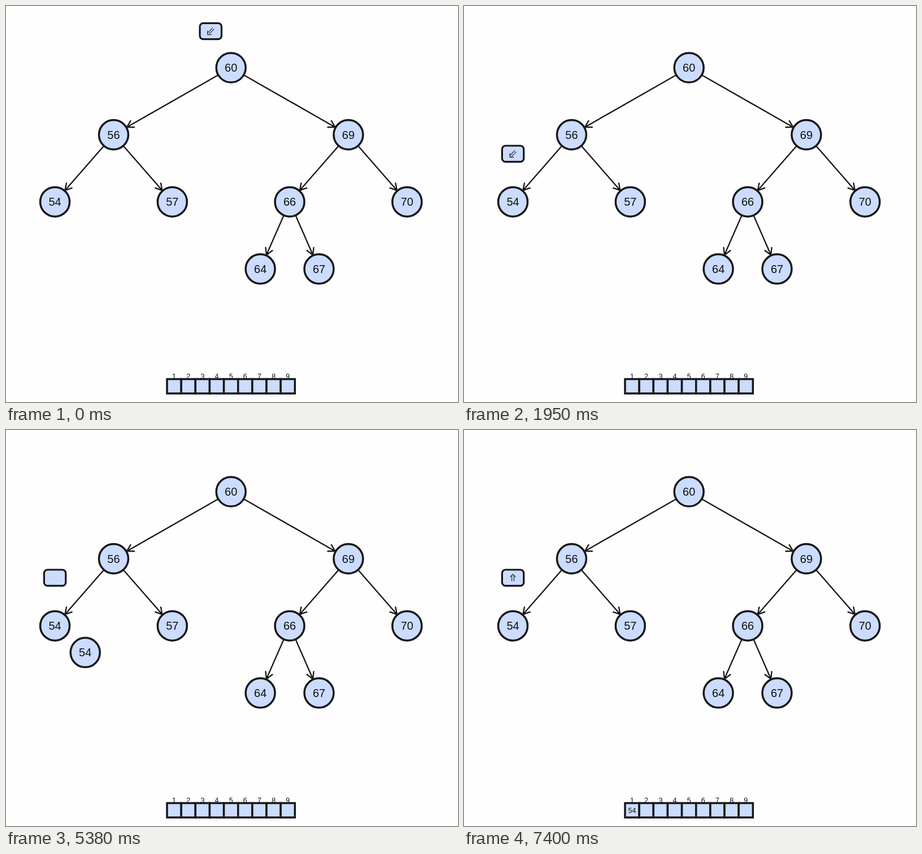
These frames come from a looping animation (800x700 px, 8 s). An HTML page:

```html
<!DOCTYPE html>
<html lang="en">
<head>
<meta charset="utf-8">
<title>Post-order tree walk</title>
<style>
  html, body { margin: 0; width: 100%; height: 100%; overflow: hidden; background: #fefefe; }
  svg { display: block; width: 800px; height: 700px; }
  text { font-family: "Liberation Sans", Arial, sans-serif; text-anchor: middle; fill: #111; }
  .shape { fill: #cbdcff; stroke: #171717; stroke-width: 3.5; }
  .box { stroke-width: 3.2; }
  .edge { fill: none; stroke: #171717; stroke-width: 2.3; }
  .sign { fill: none; stroke: #141824; stroke-width: 1.1; }
</style>
</head>
<body>
<svg id="stage" viewBox="0 0 800 700"></svg>
<script>
const LOOP = 8000, TICK = 140, RADIUS = 26;
const stage = document.getElementById('stage');

function add(parent, tag, attrs, text) {
  const el = document.createElementNS('http://www.w3.org/2000/svg', tag);
  for (const key in attrs) el.setAttribute(key, attrs[key]);
  if (text !== undefined) el.textContent = text;
  parent.appendChild(el);
  return el;
}

const mix = (a, b, part) => a.map((v, i) => v + (b[i] - v) * part);
const moveTo = (el, [x, y]) => el.setAttribute('transform', `translate(${x} ${y})`);
const show = (el, on) => el.setAttribute('visibility', on ? 'visible' : 'hidden');

// Binary search tree: the sideways distance halves with each row
const nodes = {};
function insert(value) {
  let x = 398.2, y = 109, spread = 207.74, parent;
  for (let at = nodes.root; at; at = at[value < parent.value ? 'less' : 'more']) {
    parent = at;
    x += value < at.value ? -spread : spread;
    y += 118.6;
    spread /= 2;
  }
  const node = nodes[value] = { value, pos: [x, y], parent };
  if (parent) parent[value < parent.value ? 'less' : 'more'] = node;
  else nodes.root = node;
  return node;
}

function drawEdge(from, to) {
  const angle = Math.atan2(to[1] - from[1], to[0] - from[0]);
  const back = ([x, y], length, turn = 0) =>
    [x - length * Math.cos(angle + turn), y - length * Math.sin(angle + turn)];
  const tip = back(to, 27);
  add(stage, 'path', {
    class: 'edge',
    d: `M${back(from, -27)}L${tip}M${back(tip, 14, -0.52)}L${tip}L${back(tip, 14, 0.52)}`
  });
}

function drawNode({ value, pos }) {
  const g = add(stage, 'g');
  add(g, 'circle', { class: 'shape', r: RADIUS });
  add(g, 'text', { y: 7, 'font-size': 20 }, value);
  moveTo(g, pos);
  return g;
}

const tree = [60, 56, 69, 54, 57, 66, 70, 64, 67].map(insert);
for (const { parent, pos } of tree) if (parent) drawEdge(parent.pos, pos);
tree.forEach(drawNode);

// Output row
const CELL = 25.15;
for (let i = 0; i < 9; i++) {
  const x = 285 + CELL * i;
  add(stage, 'text', { x: x + CELL / 2, y: 658.5, 'font-size': 12.5 }, i + 1);
  add(stage, 'rect', { class: 'shape', x, y: 659.5, width: CELL, height: 25.4 });
}
const result = add(stage, 'text', { x: 297.5, y: 677, 'font-size': 12.5 }, 54);

// Walking box and its signs
const box = add(stage, 'g');
add(box, 'rect', { class: 'shape box', x: -19.2, y: -14.2, width: 38.4, height: 28.4, rx: 6 });
const sign = (d, flip = 1) => add(box, 'path', { class: 'sign', d, transform: `scale(${flip} 1)` });
const slanted = 'M-5.5,-1V6.2H1.7M3.6,-6L-5.2,2.8M6,-3.6L-2.8,5.2';
const left = sign(slanted);
const right = sign(slanted, -1);
const up = sign('M-4.8,-1.4L0,-6.2L4.8,-1.4M-1.9,-4.2V6M1.9,-4.2V6');
const strike = add(box, 'rect', { x: -6.5, y: -0.8, width: 14, height: 1.5, fill: '#141824' });

const copy = drawNode(nodes[54]);

// Share of a path covered: one equal hop per tick
function hops(t, start, first, hop) {
  if (t < start) return 0;
  return Math.min(1, first + hop * Math.floor((t - start) / TICK));
}

const above = v => [nodes[v].pos[0], nodes[v].pos[1] - 85];

function draw(t) {
  const reached = mix(above(60), above(56), hops(t, -20, 0.173, 0.174));
  moveTo(box, t < 1380 ? reached : mix(above(56), above(54), hops(t, 1380, 0.15, 0.27)));
  moveTo(copy, mix(nodes[54].pos, [398.2, 620], hops(t, 5240, 0.0685, 0.1037)));

  show(left, t < 3130);
  show(right, t >= 3130 && t < 4530);
  show(strike, t >= 2540 && t < 3130 || t >= 3820 && t < 4530);
  show(up, t >= 7400);
  show(copy, t >= 4530 && t < 6800);
  show(result, t >= 6800);
}

const began = performance.now();
function frame() {
  draw((performance.now() - began) % LOOP);
  requestAnimationFrame(frame);
}
draw(0);
requestAnimationFrame(frame);
</script>
</body>
</html>
```
